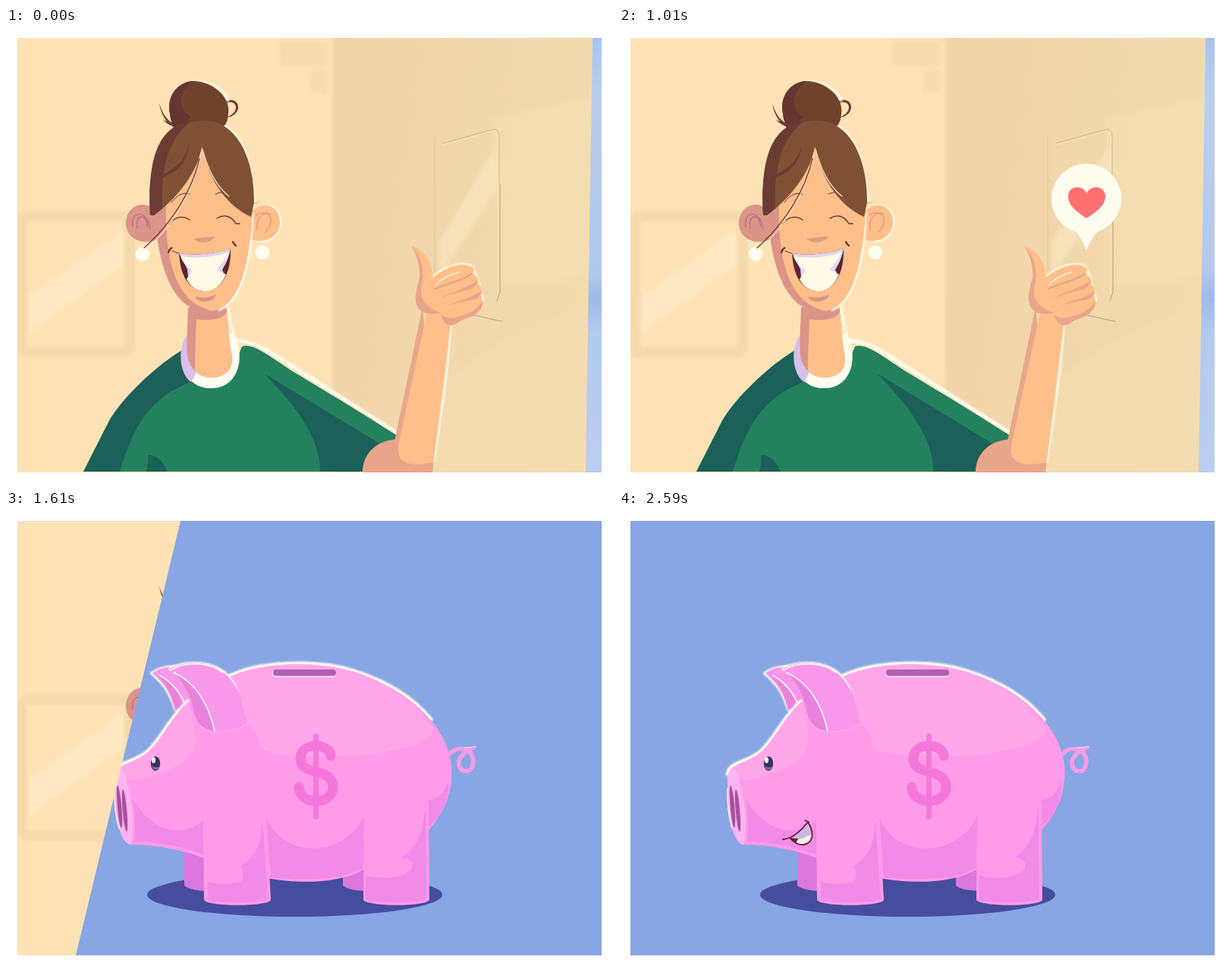
Write an HTML page that moves like this. It is 800 px wide and 600 px high and loops after 3090 ms.

```html
<!DOCTYPE html>
<html lang="en">
<head>
<meta charset="utf-8">
<title>Thumbs up, savings up</title>
<style>
html, body { margin: 0; width: 100%; height: 100%; overflow: hidden; background: #fff; }
.stage { position: absolute; left: 0; top: 0; width: 800px; height: 600px; clip-path: inset(13px 15px 14px 15px); }
svg { position: absolute; left: 0; top: 0; width: 800px; height: 600px; }
.line { fill: none; stroke-linecap: round; stroke-linejoin: round; }
.glow { fill: none; stroke: #fffdf2; stroke-linecap: round; filter: url(#soft); }
.skin { fill: #ffbf8a; }
.blush { fill: #db9488; }
.tan { fill: #e9a58b; }
.cream { fill: #fffdf0; }
.green { fill: #23825d; }
.teal { fill: #1c6059; }
.pink { fill: #ff9be9; }
.shade { fill: #f28be8; }
.far { fill: #da78dd; }

.bank, .arm, .bubble, .coin, .pig, .shadow, .rays, .grin { animation: 3.09s step-end infinite; }
.bank { animation-name: wipe; clip-path: polygon(var(--x) 13px, 1000px 13px, 1000px 586px, calc(var(--x) - 138px) 586px); }
.arm { animation-name: wave; transform-origin: 538px 600px; }
.bubble { animation-name: pop; transform-origin: 616px 293px; }
.coin { animation-name: drop; }
.pig { animation-name: hop; transform-origin: 380px 506px; }
.shadow { animation-name: shrink; transform-origin: 380.5px 506px; }
.rays { animation-name: flash; transform-origin: 405px 172px; }
.grin { animation-name: smile; }

@keyframes wave {
  0%, 16.18%, 32.685% { transform: none; }
  4.206%, 12.135%, 20.064%, 28.478%, 36.893%, 47.572% { transform: rotate(7deg); }
  8.09%, 24.271%, 41.1% { transform: rotate(14deg); }
}
@keyframes pop {
  0% { transform: scale(0); }
  12.135% { transform: scale(.6); }
  16.18% { transform: scale(1.3); }
  20.064%, 100% { transform: none; }
}
@keyframes wipe {
  0% { --x: 950px; }
  47.572% { --x: 700px; }
  49.838% { --x: 465px; }
  52.103% { --x: 230px; }
  54.368%, 100% { --x: 0px; }
}
@keyframes drop {
  0% { transform: translateY(-200px); }
  58.899% { transform: translateY(-96px); }
  61.165% { transform: translateY(-52px); }
  63.43% { transform: none; }
  65.695% { transform: translateY(55px); }
  67.961% { transform: translateY(105px); }
  70.226%, 100% { transform: translateY(200px); }
}
@keyframes hop {
  0%, 83.818% { transform: none; }
  72.491% { transform: scaleY(.985); }
  74.757% { transform: translate(-8px, -16px) rotate(3deg); }
  77.022% { transform: translate(-18px, -38.8px) rotate(5.3deg); }
  79.288% { transform: translate(-10px, -44px) rotate(2deg); }
  81.553% { transform: translate(2px, -22px) rotate(-1.5deg); }
}
@keyframes shrink {
  0%, 83.818% { transform: none; }
  74.757% { transform: scale(.95); }
  77.022%, 79.288% { transform: scale(.888, .9); }
  81.553% { transform: scale(.94); }
}
@keyframes flash {
  0%, 81.553%, 100% { transform: scale(0); }
  74.757% { transform: scale(.6); }
  77.022% { transform: none; }
  79.288% { transform: translateY(-20px) scale(1.1); }
}
@keyframes smile {
  0% { opacity: 0; }
  74.757%, 100% { opacity: 1; }
}
</style>
</head>
<body>
<div class="stage">

<svg viewBox="0 0 800 600">
  <defs>
    <filter id="soft" x="-30%" y="-30%" width="160%" height="160%"><feGaussianBlur stdDeviation="1.2"/></filter>
    <filter id="hazy" x="-30%" y="-30%" width="160%" height="160%"><feGaussianBlur stdDeviation="2.4"/></filter>
    <linearGradient id="wall" x2="1" y2=".25">
      <stop offset="0" stop-color="#f0d5a8"/><stop offset="1" stop-color="#f3dbaf"/>
    </linearGradient>
    <linearGradient id="pane" x2="0" y2="1">
      <stop offset="0" stop-color="#a9c3ec"/><stop offset=".13" stop-color="#b9ceed"/>
      <stop offset=".54" stop-color="#b3c9ec"/><stop offset=".6" stop-color="#9fbae8"/>
      <stop offset=".68" stop-color="#b4caee"/><stop offset="1" stop-color="#bacff0"/>
    </linearGradient>
  </defs>

  <!-- room -->
  <rect width="800" height="600" fill="#ffe3b6"/>
  <g filter="url(#hazy)">
    <rect x="430" y="-10" width="400" height="620" fill="url(#wall)"/>
    <path d="M640,120Q720,100 790,88V325Q720,335 655,342Z" fill="#f6dfb5" opacity=".45"/>
    <path d="M560,480Q660,390 790,365V610H540Z" fill="#f6deb4" opacity=".5"/>
    <path d="M360,18H424V86H400V55H424V50H360Z" fill="#f7dbad"/>
    <rect x="21" y="248" width="142" height="180" rx="6" fill="none" stroke="#f5d9ab" stroke-width="14"/>
    <path d="M30,354L155,266V312L30,402Z" fill="#ffe9c4"/>
    <path d="M571,282L648,152V212L571,328Z" fill="#f6e1ba"/>
    <path d="M566,144V366" stroke="#ecd1a4" stroke-width="3"/>
  </g>
  <g class="line" stroke="#b8a078" stroke-width="1">
    <path d="M576,152L641,134Q650,131 650,145V206" stroke="#d2b88d"/>
    <path d="M577,154L641,136Q648,134 648,145V352" stroke="#f8e6c4"/>
    <path d="M651,206V348L647,360M596,374L654,387"/>
    <path d="M565,143V368L572,370" stroke="#e4c89b"/>
  </g>
  <path d="M773,13H785V586H764Z" fill="url(#pane)"/>

  <!-- raised upper arm and jumper -->
  <path class="glow" stroke-width="4.500" d="M303,412C313,413 330,416 346,426L415,470L514,533"/>
  <path class="green" d="M232,425C195,447 152,490 136,518L102,585H470C468,565 485,545 516,545V538C470,508 410,472 380,454C350,435 325,414 311,420L306,432Z"/>
  <path class="teal" d="M232,425C195,447 152,490 136,518L102,585H150C163,545 178,490 246,466Z"/>
  <path class="teal" d="M185,585Q188,573 187,563C199,563 207,571 213,585Z"/>
  <path class="teal" d="M341,457C385,500 415,545 414,585H472L494,550L518,544L514,541C450,510 390,477 341,457Z"/>
  <path class="green" d="M349,461L494,549L515,544V538L365,450Z"/>
  <path class="tan" d="M470,587C469,560 492,541 518,543L552,560L563,568L562,587Z"/>

  <!-- neck and collar -->
  <path class="glow" stroke-width="3" d="M293,370C296,390 298,402 304,412"/>
  <path class="cream" d="M240,403C226,418 226,475 270,475C311,475 315,425 299,403Z"/>
  <path d="M240,403C226,418 227,455 244,467Q250,458 252,448Q236,430 240,403Z" fill="#d9bfe9"/>
  <path class="blush" d="M240,368C239,400 237,425 240,437Q248,460 270,461C292,460 301,448 297,428C293,410 293,390 290,365Z"/>
  <path class="skin" d="M251,380C250,410 249,430 249,451Q257,461 272,461C292,460 301,448 297,428C293,410 293,390 290,365Z"/>
  <path class="blush" d="M240,370H291V375C285,386 258,388 240,381Z"/>

  <!-- ears -->
  <path class="glow" stroke-width="3" d="M331,239C348,227 365,242 361,260C358,276 346,283 330,280"/>
  <path class="blush" d="M196,240C182,226 158,234 158,258C159,278 179,287 199,279Z"/>
  <path class="skin" d="M324,243C336,227 361,232 361,257C360,275 343,285 322,279Z"/>
  <g class="line" stroke="#b66a86" stroke-width="1.2">
    <path d="M167,262C163,240 187,239 190,265M173,264C169,248 184,241 187,262"/>
    <path stroke="#db9480" d="M331,266C328,242 351,238 349,256C348,262 345,266 342,269M329,247Q339,241 350,246"/>
  </g>
  <circle class="cream" cx="180" cy="298" r="9.3"/>
  <circle class="cream" cx="338" cy="296" r="9.3"/>

  <!-- face -->
  <path class="glow" stroke-width="3" d="M325,245C323,300 314,356 281,372"/>
  <path class="blush" d="M195,225C197,290 210,371 264,374C310,372 322,300 325,235L258,148Z"/>
  <path class="skin" d="M211,225C209,300 220,362 272,373C312,366 322,300 325,235L258,148Z"/>
  <g class="line" stroke="#5b3030" stroke-width="1.4">
    <path d="M215,259C223,248 234,247 242,253M278,251C288,245 297,248 303,258L308,258"/>
    <path stroke-width="1" d="M218,230C225,220 234,216 242,219M276,219C284,215 291,217 295,222"/>
    <path stroke-width="2.2" d="M214,296Q215,292 218,290M299,282Q301,286 303,287"/>
    <path stroke-width="1" d="M219,294L230,298"/>
  </g>
  <path d="M247,278Q261,275 276,275C268,285 255,285 247,278Z" fill="#e29b80"/>
  <path d="M228,297Q262,302 296,291C297,326 282,347 262,347C241,346 230,328 228,297Z" fill="#5a2430"/>
  <path d="M228,297Q262,302 296,291C293,307 288,313 285,319L289,327C282,342 272,347 262,347C249,346 242,338 240,329L239,318Z" fill="#e3d5ec"/>
  <path d="M230,301Q262,306 293,296C290,308 281,312 278,319L290,325C282,342 272,347 262,347C249,346 242,340 238,331L246,319C238,315 233,309 230,301Z" fill="#fffbe6"/>
  <path class="blush" d="M249,354Q263,358 277,351C276,363 251,364 249,354Z"/>

  <!-- hair -->
  <g fill="#6b3c34">
    <path d="M202,99C207,116 214,124 228,130L224,133C211,125 204,114 202,99Z"/>
    <path d="M207,121Q217,126 229,126L227,131Q215,130 207,121Z"/>
    <path d="M290,96C300,92 307,98 306,106C304,113 299,117 291,118C299,114 303,110 303,104C302,98 297,97 290,99Z"/>
    <path d="M325,232L336,229L326,231Z"/>
  </g>
  <path class="glow" stroke-width="3" d="M247,70C272,71 288,82 293,96M266,122C303,126 323,160 327,230"/>
  <path d="M216,113C211,87 229,70 248,70C274,71 296,92 293,112C293,122 289,130 283,132L224,132Q217,126 216,113Z" fill="#6f432b"/>
  <path d="M216,113C211,87 229,70 248,70C228,82 224,105 243,117L232,132H224Q217,126 216,113Z" fill="#633631"/>
  <path d="M190,247C186,170 205,122 262,122C309,124 328,180 327,230L323,249C292,235 268,203 258,156C253,190 226,224 195,247Z" fill="#7e5135"/>
  <path d="M190,247C186,170 202,128 244,123C215,145 204,180 206,238L195,247Z" fill="#6b3c34"/>
  <path d="M207,193C226,184 237,172 241,153C239,176 229,188 207,197Z" fill="#6b3c34"/>
  <path class="line" d="M259,160C267,190 280,211 294,222" stroke="#ffe2c4" stroke-width="1.2"/>
  <path class="line" d="M257,164C249,212 222,257 192,285" stroke="#ffe2c4" stroke-width="1.2"/>
  <path class="line" d="M255,172C246,213 220,256 182,290" stroke="#633631" stroke-width="1.2"/>

  <!-- waving forearm -->
  <g class="arm">
    <path class="glow" stroke-width="2.500" d="M586,393C583,450 572,520 564,572M564,327C586,309 612,307 617,319L622,332L629,360"/>
    <path class="tan" d="M549,368L512,545L516,572L533,581L562,584L566,550Z"/>
    <path class="skin" d="M556,370L517,550C514,574 530,579 563,573L567,545L586,390Z"/>
    <path class="skin" d="M534,287C554,293 563,312 562,330C577,316 604,306 616,317Q618,321 612,324Q625,327 622,337Q631,346 626,352L629,364C623,382 606,382 598,387Q590,393 584,392C575,390 573,382 569,377Q551,380 543,369C537,358 541,344 545,329C546,311 541,298 534,287Z"/>
    <path class="tan" d="M534,287C551,305 552,327 547,345Q545,365 573,376Q551,380 543,369C537,358 541,344 545,329C546,311 541,298 534,287Z"/>
    <path class="tan" d="M566,360C588,347 607,344 621,333Q620,343 609,345C594,350 582,351 566,360ZM571,371C592,360 611,358 626,347Q625,358 613,359C596,362 585,364 571,371ZM573,377Q579,384 590,382C607,378 619,374 628,360C627,380 606,382 598,387Q590,393 584,392Q576,390 573,377Z"/>
    <path class="line" d="M566,344C582,336 601,334 614,324" stroke="#e9a58b" stroke-width="2.5"/>
    <path class="line" d="M566,339Q579,326 597,322" stroke="#fff0d8" stroke-width="1.6"/>
  </g>

  <!-- like bubble -->
  <g class="bubble">
    <circle class="cream" cx="616" cy="225" r="46"/>
    <path class="cream" d="M596,262C606,270 610,280 616,293C623,278 627,270 638,262Z"/>
    <path d="M616,251C605,243 592,235 592,222C592,214 597,210 604,210C610,210 614,213 616.500,218C619,213 623,210 629,210C636,210 641,215 641,222C641,235 628,243 616,251Z" fill="#ff7170"/>
  </g>
</svg>

<svg class="bank" viewBox="0 0 800 600">
  <defs>
    <clipPath id="above"><rect width="800" height="213"/></clipPath>
  </defs>
  <rect width="800" height="600" fill="#88a5e4"/>
  <ellipse class="shadow" cx="380.5" cy="506" rx="194.5" ry="29" fill="#464c9e"/>

  <g class="pig">
    <path class="far" d="M235,440H275V501Q245,502 235,494ZM444,465H480V501Q452,501 444,494Z"/>

    <!-- tail -->
    <path class="line" d="M584,321C592,312 604,311 612,319C619,328 616,343 607,343C597,343 594,331 600,324Q604,318 611,315" stroke="#ff9be9" stroke-width="5.5"/>
    <path d="M604,312Q613,313 622,310.500Q617,316 608,318Z" fill="#ff9be9"/>
    <path class="line" d="M604,312Q612,312 619,310.500" stroke="#ffe3fa" stroke-width="1"/>

    <!-- back ear, body -->
    <path class="glow" stroke-width="5" d="M224,262C217,240 210,229 193,214Q205,205 225,206"/>
    <path d="M193,214C206,204 218,205 230,207L246,250L223,264C217,240 210,229 193,214Z" fill="#f997ea"/>
    <path d="M200,216C215,224 228,238 233,256L224,262C218,240 211,229 200,216Z" fill="#ea82dc"/>
    <path class="line" d="M203,217C219,226 230,240 235,253" stroke="#fff" stroke-width="1.6"/>
    <path class="glow" stroke-width="7" d="M144,346C150,330 170,333 188,317C207,299 216,274 240,252M290,221C330,199 408,196 459,212C503,226 536,247 559,275"/>
    <path class="pink" d="M144,347C150,331 170,333 188,317C207,299 216,274 240,252L290,221C330,199 408,196 459,212C530,235 582,283 587,335C590,372 576,400 556,422L471,473C438,492 385,491 349,485L262,458C232,447 200,440 164,440Z"/>

    <!-- shading -->
    <path class="shade" d="M163,372C190,425 235,434 262,405V454C232,442 200,436 168,436Z"/>
    <path class="shade" d="M343,404C365,460 448,458 473,400V470C440,488 385,488 349,483Z"/>
    <path class="shade" d="M556,381C570,380 579,370 583,355C584,384 572,405 556,417Z"/>

    <!-- near legs -->
    <path class="pink" d="M260,405H343L349,513C345,522 266,522 261,513Z"/>
    <path class="shade" d="M338,407C337,445 325,458 309,468Q316,479 309,489Q290,494 266,489V512C276,518 335,518 345,511Z"/>
    <path class="pink" d="M472,385H557L558,513C552,522 478,522 471,513Z"/>
    <path class="shade" d="M553,386C550,430 537,447 521,457Q538,459 535,470C528,485 495,487 474,480V512C486,518 545,518 554,511Z"/>

    <!-- light from above -->
    <g fill="#ffc0e9" opacity=".33">
      <path d="M290,221C330,199 408,196 459,212C510,229 545,258 563,286C566,306 510,320 450,323C400,325 360,322 343,316C332,310 334,296 320,280Z"/>
      <path d="M240,252C216,274 207,299 188,317C170,333 150,331 146,342L162,356C200,350 262,334 248,285L244,262Z"/>
    </g>

    <!-- dollar sign -->
    <g class="line" stroke="#f576da" opacity=".95">
      <path stroke-width="13" d="M428,323C427,306 388,303 388,327C388,350 431,338 431,364C431,389 386,388 386,364"/>
      <path stroke-width="7" d="M408.500,297V403"/>
    </g>

    <!-- slot -->
    <rect x="351" y="210" width="84" height="9" rx="4.500" fill="#fff0fa"/>
    <rect x="352" y="209" width="83" height="8.500" rx="4" fill="#b05fae"/>

    <!-- front ear -->
    <path class="glow" stroke-width="5" d="M217,208C240,197 270,200 287,213Q298,223 303,236"/>
    <path d="M216,208C238,197 268,198 287,213C306,229 315,257 319,280C306,291 286,294 273,291Q251,285 248,268C242,240 232,224 216,208Z" fill="#f997ea"/>
    <path d="M221,213C250,226 267,255 275,291Q252,286 249,270C244,242 234,226 221,213Z" fill="#ea82dc"/>
    <path class="line" d="M217,210C236,198 268,199 286,213M221,213C250,226 267,255 275,290" stroke="#fff" stroke-width="1.6"/>
    <path class="line" d="M248,270Q253,288 273,291Q301,293 319,280L312,253" stroke="#ffa6ee" stroke-width="2"/>

    <!-- snout and eye -->
    <path d="M143,350C146,336 156,337 162,361C169,390 170,424 165,440C154,441 145,412 143,390Z" fill="#ffb4f1"/>
    <path class="line" d="M160,353C169,390 171,421 166,438" stroke="#ff9be9" stroke-width="3"/>
    <path class="line" d="M143,366Q142,394 149,418" stroke="#fff" stroke-width="1.5" opacity=".8"/>
    <ellipse cx="149.500" cy="390" rx="2.800" ry="28" transform="rotate(-5 149.500 390)" fill="#a8509e"/>
    <ellipse cx="156.500" cy="395" rx="2.800" ry="28" transform="rotate(-5 156.500 395)" fill="#a8509e"/>
    <ellipse cx="197" cy="333" rx="6.200" ry="9.500" fill="#37305c"/>
    <path d="M192,336Q198,340 203,336Q200,343 197,341Q193,341 192,336Z" fill="#7469a8"/>
    <ellipse cx="194.500" cy="328.500" rx="2.600" ry="4" fill="#fff"/>

    <g class="grin">
      <path d="M225,431C238,425 244,416 249,410C258,425 256,438 243,440Q234,441 225,431Z" fill="#c9bbe0"/>
      <path d="M230,435C240,433 248,429 254,426C255,440 239,443 230,435Z" fill="#f6f1e6"/>
      <path d="M225,431Q231,432 236,432L233,438Z" fill="#6b1730"/>
      <path class="line" d="M216,433Q222,432 225,431C238,425 244,416 249,410C258,425 256,438 243,440Q234,441 225,431M245,408L250,410" stroke="#6b1730" stroke-width="1.8"/>
    </g>
  </g>

  <g clip-path="url(#above)">
    <g class="coin">
      <ellipse cx="391" cy="104" rx="34" ry="34" fill="#ffa24a"/>
      <ellipse cx="397" cy="104" rx="34" ry="34" fill="#ffcf4b"/>
      <path d="M366,119L411,73L425,86L382,134Q371,129 366,119Z" fill="#ffc24b" opacity=".5"/>
      <path d="M400,82C428,84 428,125 399,127C422,120 422,89 400,82Z" fill="#ffa24a"/>
    </g>
  </g>

  <path class="line rays" d="M368,125L389,153M414,108L409,143M456,138L427,159" stroke="#fffdee" stroke-width="8"/>
</svg>

</div>
</body>
</html>
```
